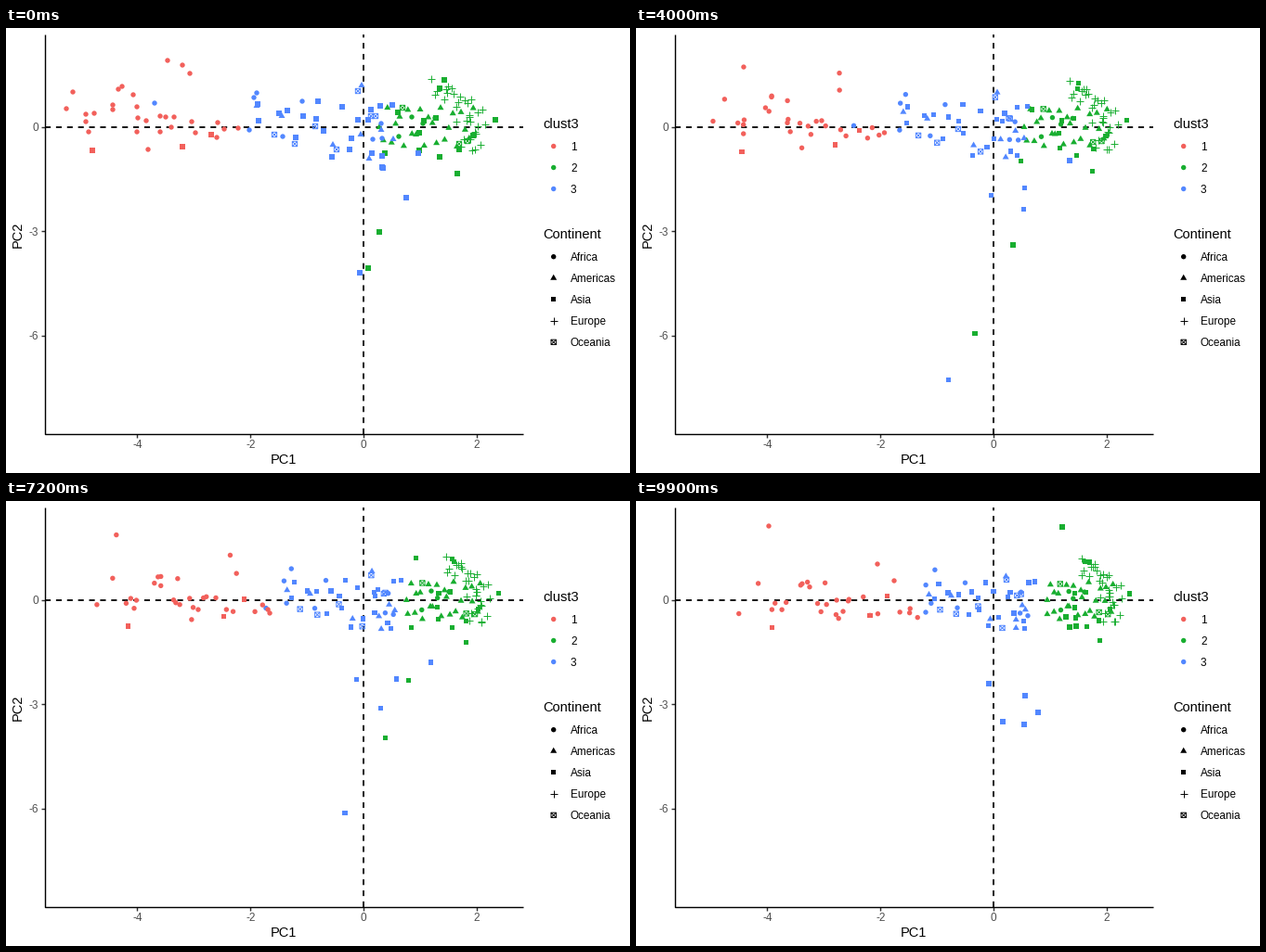
A matplotlib script for the animation above (10000 ms loop, 672x480 px).

```python
import numpy as np
import matplotlib.pyplot as plt
from matplotlib.animation import FuncAnimation
from matplotlib.path import Path

W, H, DPI = 672, 480, 96
FRAMES, INTERVAL = 100, 100
TURN, LAST = 51, FRAMES - 1
RED, GREEN, BLUE = "#F2605B", "#18AE30", "#5287FF"
PX = 72 / DPI

# cluster: x scale, x shift, y scale, y shift, spread over one loop
DRIFT = {
    RED: (.92, 71, .45, 67, 9),
    GREEN: (.72, 150, .88, 13, 2),
    BLUE: (.72, 125, .8, 25, 5),
}

plt.rcParams["font.family"] = "Liberation Sans"
rng = np.random.default_rng(4)
fig = plt.figure(figsize=(W / DPI, H / DPI), dpi=DPI, facecolor="white")
ax = fig.add_axes([0, 0, 1, 1])
ax.set(xlim=(0, W), ylim=(H, 0))
ax.axis("off")


def strokes(*lines):
    verts = [p for line in lines for p in line]
    codes = [c for line in lines
             for c in [Path.MOVETO] + [Path.LINETO] * (len(line) - 1)]
    return Path(verts, codes)


TRIANGLE = Path([(0, 1), (-.866, -.5), (.866, -.5), (0, 1)], closed=True)
PLUS = strokes([(-1, 0), (1, 0)], [(0, -1), (0, 1)])
CROSSBOX = strokes([(-1, -1), (1, -1), (1, 1), (-1, 1), (-1, -1), (1, 1)],
                   [(-1, 1), (1, -1)])

# marker, size in px, filled
SHAPES = {
    "Africa": ("o", 5.4, True),
    "Americas": (TRIANGLE, 8.1, True),
    "Asia": ("s", 5.3, True),
    "Europe": (PLUS, 8, False),
    "Oceania": (CROSSBOX, 5.4, False),
}


def dots(xy, color, continent):
    marker, size, filled = SHAPES[continent]
    x, y = np.transpose(xy)
    return ax.scatter(x, y, s=(size * PX) ** 2, marker=marker,
                      facecolors=color if filled else "none",
                      edgecolors="none" if filled else color,
                      linewidths=0 if filled else .95 * PX, zorder=3)


def line(x, y, color="black", width=1.42, **kw):
    ax.plot(x, y, color=color, lw=width * PX, solid_capstyle="butt", **kw)


def label(x, y, text, size=8.8, color="black", **kw):
    kw = {"va": "baseline", **kw}
    ax.text(x, y, text, fontsize=size, color=color, **kw)


def draw_axes():
    left, right, top, bottom = 41.5, 556.5, 7.3, 438
    for value in (-4, -2, 0, 2):
        x = 385 + 60.9 * value
        line([x, x], [bottom, bottom + 3.7], "#333333")
        label(x, 453, str(value), color="#4D4D4D", ha="center")
    for value in (0, -3, -6):
        y = 107 - 37.45 * value
        line([left - 3.7, left], [y, y], "#333333")
        label(35, y + 4.2, str(value), color="#4D4D4D", ha="right")
    line([left, left, right], [top, bottom, bottom])
    dash = {"width": 1.8, "linestyle": (0, (3.4, 3.2)),
            "dash_capstyle": "butt", "zorder": 2}
    line([left, right], [107, 107], **dash)
    line([385, 385], [bottom, top], **dash)
    label(298.5, 470, "PC1", 11, ha="center")
    label(13, 222.5, "PC2", 11, ha="center", va="center", rotation=90)


def draw_legend():
    label(578, 108, "clust3", 11)
    for i, color in enumerate((RED, GREEN, BLUE)):
        y = 127.5 + 23 * i
        dots([(589.7, y)], color, "Africa")
        label(608, y + 4.2, str(i + 1))
    label(578, 227, "Continent", 11)
    for i, name in enumerate(SHAPES):
        y = 246.7 + 23.04 * i
        dots([(589.7, y)], "black", name)
        label(608, y + 4.2, name)


groups = []


def cloud(color, continent, points):
    """Points that drift with their cluster."""
    start = np.reshape(points, (-1, 2)).astype(float)
    sx, ox, sy, oy, spread = DRIFT[color]
    end = start * (sx, sy) + (ox, oy) + rng.normal(0, spread, start.shape)
    groups.append((dots(start, color, continent),
                   start, (start + end) / 2, end))


def track(color, continent, *stops):
    """One point that changes direction halfway."""
    start, turn, end = (np.array([s], float) for s in stops)
    groups.append((dots(start, color, continent), start, turn, end))


def arc(n=32):
    t = np.linspace(0, 1, n)
    x = 463 + 43 * np.sin(1.9 * t) + rng.normal(0, 7, n)
    y = 62 + 68 * t ** 1.3 + rng.normal(0, 5, n)
    return np.column_stack([x, y])


def band(n=24):
    i = np.arange(n)
    return np.column_stack([402 + 4.4 * i, 107 + 21 * np.sin(2.4 * i)])


cloud(GREEN, "Europe", arc())
cloud(GREEN, "Americas", band())
cloud(GREEN, "Africa", [423, 117, 449, 103, 462, 97, 437, 96])
cloud(GREEN, "Asia",
      [472, 56, 527, 99, 467, 139, 488, 131, 486, 157, 450, 100, 445, 113,
       463, 97, 503, 116, 445, 132, 467, 65])
cloud(GREEN, "Oceania", [427, 86, 488, 125, 497, 122])
track(GREEN, "Asia", (390, 259), (358, 349), (474, 135))
track(GREEN, "Asia", (402, 220), (407, 238), (467, 136))
track(GREEN, "Asia", (422, 91), (428, 87), (459, 28))
track(GREEN, "Asia", (408, 135), (416, 146), (463, 125))

cloud(BLUE, "Americas",
      [383, 62, 270, 84, 297, 95, 352, 126, 382, 115, 391, 141, 417, 120,
       404, 110])
cloud(BLUE, "Africa",
      [319, 79, 270, 70, 267, 75, 262, 110, 298, 117, 404, 103, 395, 120,
       405, 119])
cloud(BLUE, "Asia",
      [272, 100, 271, 82, 294, 92, 303, 89, 336, 79, 320, 95, 334, 98,
       312, 118, 342, 111, 351, 139, 370, 131, 372, 119, 379, 99, 390, 99,
       362, 85, 393, 88, 403, 84, 416, 83, 405, 138, 394, 135])
cloud(BLUE, "Oceania",
      [379, 68, 289, 115, 311, 125, 333, 106, 356, 131, 393, 95, 398, 95])
track(BLUE, "Africa", (160, 81), (255, 112), (312, 120))
track(BLUE, "Asia", (381, 264), (324, 411), (418, 241))
track(BLUE, "Asia", (431, 183), (477, 132), (433, 228))
track(BLUE, "Asia", (444, 135), (410, 212), (395, 238))
track(BLUE, "Asia", (406, 151), (422, 178), (419, 210))
track(BLUE, "Asia", (405, 150), (376, 189), (380, 197))

cloud(RED, "Africa",
      [65, 87, 72, 69, 86, 93, 86, 101, 89, 112, 95, 92, 115, 83, 115, 88,
       121, 66, 125, 63, 137, 72, 141, 85, 142, 97, 151, 100, 141, 112,
       153, 131, 166, 95, 172, 96, 181, 96, 166, 112, 178, 107, 200, 101,
       204, 113, 228, 102, 227, 118, 235, 109, 250, 108])
cloud(RED, "Asia", [93, 132, 190, 128, 221, 115])
track(RED, "Africa", (174, 35), (100, 44), (143, 27))
track(RED, "Africa", (190, 40), (227, 51), (260, 68))
track(RED, "Africa", (198, 49), (225, 72), (278, 86))

draw_axes()
draw_legend()


def update(frame):
    for artist, start, turn, end in groups:
        if frame < TURN:
            xy = start + (turn - start) * frame / TURN
        else:
            xy = turn + (end - turn) * (frame - TURN) / (LAST - TURN)
        artist.set_offsets(xy)
    return [g[0] for g in groups]


anim = FuncAnimation(fig, update, frames=FRAMES, interval=INTERVAL,
                     repeat=True, repeat_delay=0, blit=False)
plt.show()
```
